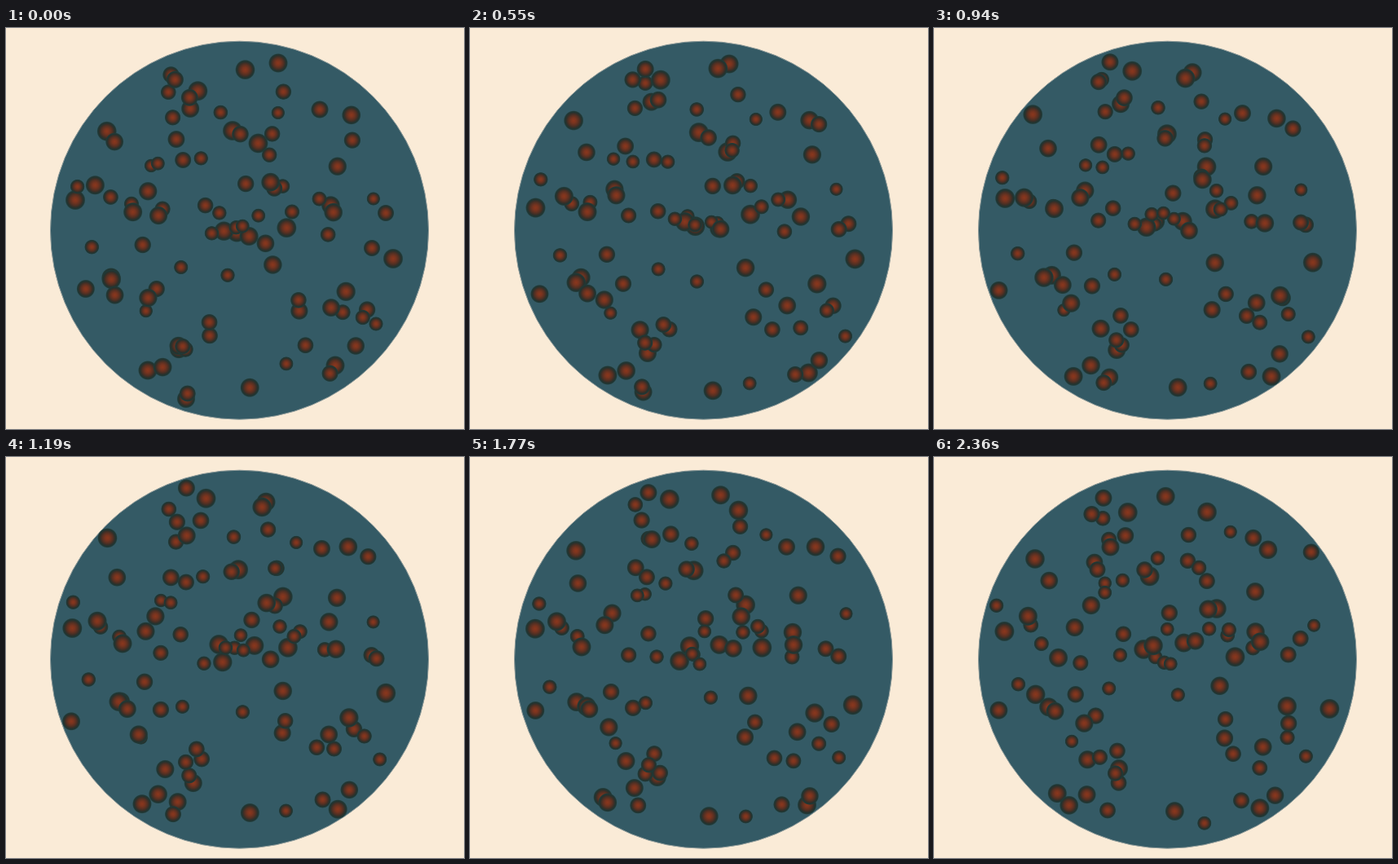
These frames come from a looping animation (562x492 px, 2.41 s). An HTML page with a canvas:

```html
<!DOCTYPE html>
<html lang="en">
<head>
<meta charset="utf-8">
<title>Random walk in a dish</title>
<style>
html, body { margin: 0; width: 100%; height: 100%; overflow: hidden; background: #faebd7; }
canvas { display: block; }
</style>
</head>
<body>
<canvas id="stage" width="562" height="492"></canvas>
<script>
const ctx = document.getElementById('stage').getContext('2d');
const LOOP = 2410, STEPS = 38, COUNT = 97, STRIDE = 5;
const CX = 286.5, CY = 248.2, DISH = 232, REACH = 220;

let seed = 7;
function random() {
  seed = (seed + 0x6d2b79f5) | 0;
  let n = Math.imul(seed ^ (seed >>> 15), 1 | seed);
  n = (n + Math.imul(n ^ (n >>> 7), 61 | n)) ^ n;
  return ((n ^ (n >>> 14)) >>> 0) / 4294967296;
}
const between = (low, high) => low + (high - low) * random();

function keepInside(x, y, r) {
  const dx = x - CX, dy = y - CY;
  const pull = Math.min(1, REACH / Math.hypot(dx, dy));
  return { x: CX + dx * pull, y: CY + dy * pull, r };
}

// Crowded left of the middle, sparse towards the rim
function scatter() {
  for (;;) {
    const angle = between(0, Math.PI * 2), reach = 230 * random() ** 0.7;
    const x = CX - 36 + reach * Math.cos(angle), y = CY + reach * Math.sin(angle);
    if (Math.hypot(x - CX, y - CY) < REACH - 8) return { x, y, r: between(8.5, 12.5) };
  }
}

// A few outlying dots
const dots = [
  [334, 43, 12], [475, 283, 12.5], [404, 414, 12], [85, 211, 12.5],
  [129, 306, 12], [174, 420, 12], [221, 455, 11.5], [278, 126, 12.5],
  [385, 100, 11], [466, 227, 10.5], [449, 270, 10.5], [454, 363, 9]
].map(([x, y, r]) => ({ x, y, r }));
while (dots.length < COUNT) dots.push(scatter());

const jitter = () => between(-STRIDE, STRIDE);
const walk = [dots];
while (walk.length < STEPS) {
  walk.push(walk[walk.length - 1].map(p => keepInside(p.x + jitter(), p.y + jitter(), p.r)));
}

function drawDot({ x, y, r }) {
  const fill = ctx.createRadialGradient(x, y, 0, x, y, r);
  fill.addColorStop(0, '#8a371d');
  fill.addColorStop(0.25, '#79341f');
  fill.addColorStop(0.5, '#583022');
  fill.addColorStop(0.7, '#352f28');
  fill.addColorStop(0.82, '#203431');
  fill.addColorStop(0.9, '#213936');
  fill.addColorStop(1, 'rgba(33,57,54,0)');
  ctx.fillStyle = fill;
  ctx.beginPath();
  ctx.arc(x, y, r, 0, Math.PI * 2);
  ctx.fill();
}

// Steps grow slightly longer over the loop, on a 10 ms clock
const stepStart = k => Math.floor((61 * k + 0.075 * k * k) / 10) * 10;

function draw(time) {
  const t = time % LOOP;
  let k = 0;
  while (k < STEPS - 1 && stepStart(k + 1) <= t) k++;
  ctx.fillStyle = '#faebd7';
  ctx.fillRect(0, 0, 562, 492);
  ctx.fillStyle = '#345a65';
  ctx.strokeStyle = '#8d9a99';
  ctx.beginPath();
  ctx.arc(CX, CY, DISH, 0, Math.PI * 2);
  ctx.fill();
  ctx.stroke();
  walk[k].forEach(drawDot);
}

const begin = performance.now();
function tick() {
  draw(performance.now() - begin);
  requestAnimationFrame(tick);
}
tick();
</script>
</body>
</html>
```
